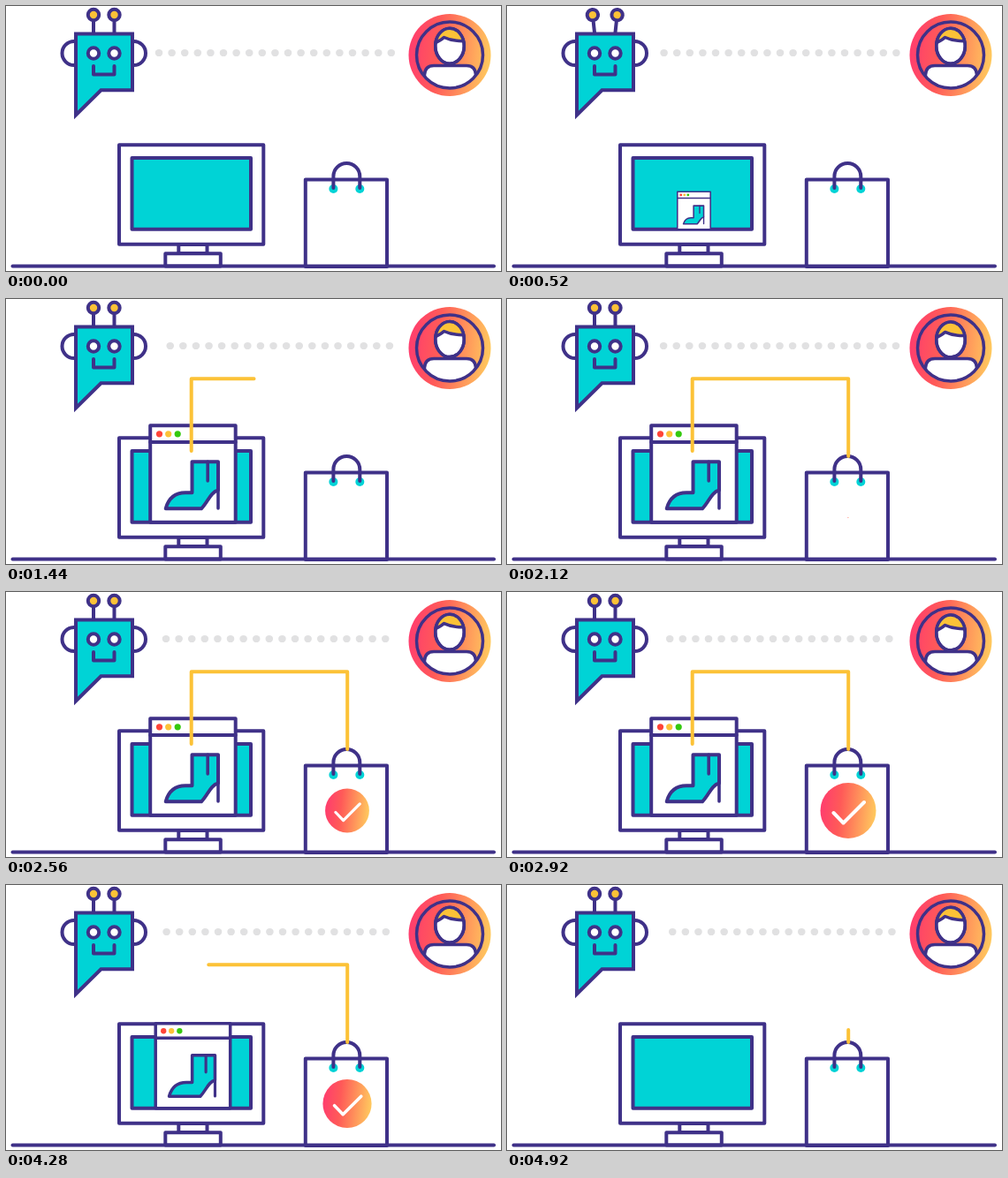
Recreate the animation shown at these times as an HTML page. Size 560 by 300 pixels, loop 4960 ms.

```html
<!DOCTYPE html>
<html lang="en">
<head>
<meta charset="utf-8">
<title>Shopping assistant</title>
<style>
html, body { margin: 0; width: 100%; height: 100%; overflow: hidden; background: #fff; }
svg { display: block; width: 100%; height: 100%; }
.ink { stroke: #3f3188; stroke-width: 4; stroke-linejoin: round; stroke-linecap: round; fill: none; }
.white { fill: #fff; }
.teal { fill: #00d3d6; }
.gold { fill: #fcc237; }
</style>
</head>
<body>
<svg viewBox="0 0 560 300">
  <defs>
    <linearGradient id="warm" x1="0" y1=".45" x2="1" y2=".55">
      <stop offset="0" stop-color="#ff3d6e"/>
      <stop offset=".35" stop-color="#ff5a58"/>
      <stop offset="1" stop-color="#ffca5e"/>
    </linearGradient>
    <clipPath id="ringClip"><circle cx="502" cy="55.5" r="37.5"/></clipPath>
    <clipPath id="headClip"><ellipse cx="502" cy="45.2" rx="16.3" ry="20"/></clipPath>
  </defs>
  <rect width="560" height="300" fill="#fff"/>

  <g id="dots" fill="#e1e1e2"></g>

  <!-- robot -->
  <g class="ink">
    <circle class="white" cx="77" cy="53.5" r="13.5"/>
    <circle class="white" cx="144.5" cy="53.5" r="13.5"/>
    <g id="antL"><path d="M99 18V30"/><circle class="gold" cx="99" cy="10" r="6.2"/></g>
    <g id="antR"><path d="M122.5 18V30"/><circle class="gold" cx="122.5" cy="10" r="6.2"/></g>
    <path class="teal" stroke-linejoin="miter" d="M79 31.5H143V95.3H107.5L79 123.5Z"/>
    <g id="eyes">
      <circle class="white" cx="99" cy="53.5" r="6.2"/>
      <circle class="white" cx="122.5" cy="53.5" r="6.2"/>
    </g>
    <path d="M99 68V77.5H122.5V68"/>
  </g>

  <!-- customer -->
  <circle cx="502" cy="55.5" r="46.5" fill="url(#warm)"/>
  <g class="ink" style="stroke-width:3.5">
    <path class="white" clip-path="url(#ringClip)" d="M473.5 100V78Q474 67.5 484 67.5H521Q531 67.5 531.5 78V100Z"/>
    <g id="head">
      <ellipse class="white" cx="502" cy="45.2" rx="16.3" ry="20"/>
      <g clip-path="url(#headClip)">
        <path id="hair" class="gold" d="M482 43Q491 40 495.500 35.500Q506 40.500 522 39.500V20H482Z"/>
      </g>
      <ellipse cx="502" cy="45.2" rx="16.3" ry="20"/>
    </g>
    <circle cx="502" cy="55.5" r="37.5"/>
  </g>

  <!-- computer -->
  <g class="ink">
    <path class="white" d="M195.300 270H227.500V280H195.300Z"/>
    <path class="white" d="M180.300 280.300H242.800V294.500H180.300Z"/>
    <path class="white" d="M128 157.300H291.300V269.700H128Z"/>
    <path class="teal" d="M142.500 172H277V252.700H142.500Z"/>
  </g>
  <g id="shop" class="ink">
    <path class="white" d="M163.200 143.200H259.700V252.700H163.200Z"/>
    <path d="M163.200 162H259.700"/>
    <g stroke="none">
      <circle cx="173.500" cy="152.800" r="3.600" fill="#ff4438"/>
      <circle cx="183.700" cy="152.800" r="3.600" fill="#fcc237"/>
      <circle cx="194.200" cy="152.800" r="3.600" fill="#35c90e"/>
    </g>
    <path class="teal" d="M210.500 184.200H240V216.500C231 219 229 229 221 237.300H180.700C184 225 192 219.300 203 219.300H210.500Z"/>
    <path d="M228.200 184.200V206M240 216.500V237" style="stroke-width:3.600"/>
  </g>

  <!-- bag -->
  <path class="ink white" d="M338.800 196.500H431V295H338.800Z"/>
  <circle class="teal" cx="370.400" cy="207" r="5"/>
  <circle class="teal" cx="400.300" cy="207" r="5"/>
  <path class="ink" d="M370.400 206V193A14.950 14.950 0 0 1 400.300 193V206"/>
  <path class="ink" d="M7.500 294.500H552"/>
  <g id="badge">
    <circle cx="386" cy="247.500" r="31.500" fill="url(#warm)"/>
    <path d="M369.500 250L380.500 261.500L404 238" fill="none" stroke="#fff" stroke-width="4" stroke-linecap="round" stroke-linejoin="round"/>
  </g>
  <path id="wire" d="M209.700 172V90.300H386.200V178" fill="none" stroke="#fcc237" stroke-width="4" stroke-linecap="round" stroke-linejoin="round"/>
</svg>
<script>
const LOOP = 4960, GAP = 14.6, DOT_START = 173, DOT_END = 441;
const $ = id => document.getElementById(id);
const wire = $('wire'), wireLen = wire.getTotalLength();

const span = (t, start, dur) => Math.min(1, Math.max(0, (t - start) / dur));
const cubic = x => x < .5 ? 4 * x ** 3 : 1 - 4 * (1 - x) ** 3;
const smooth = x => x * x * (3 - 2 * x);
const bump = (t, start, dur) => Math.sin(Math.PI * span(t, start, dur));

const dots = Array.from({ length: 19 }, () => {
  const dot = document.createElementNS('http://www.w3.org/2000/svg', 'ellipse');
  dot.setAttribute('cy', 53);
  dot.setAttribute('rx', 4.3);
  dot.setAttribute('ry', 4.1);
  return $('dots').appendChild(dot);
});

function show(el, on) {
  el.setAttribute('visibility', on ? 'visible' : 'hidden');
}

function scaleAt(el, x, y, sx, sy = sx) {
  show(el, sx > .001);
  el.setAttribute('transform', `translate(${x} ${y}) scale(${sx} ${sy}) translate(${-x} ${-y})`);
}

function draw(t) {
  const shift = t / LOOP * 3 * GAP % GAP;
  dots.forEach((dot, i) => {
    const x = DOT_START + shift + i * GAP;
    dot.setAttribute('cx', x);
    show(dot, x <= DOT_END);
  });

  // antennas and blinks repeat twice per loop
  const u = t % (LOOP / 2);
  const tilt = 8.5 * bump(u, 440, 320) - 2.5 * bump(u, 760, 320);
  $('antL').setAttribute('transform', `rotate(${-tilt} 99 30)`);
  $('antR').setAttribute('transform', `rotate(${tilt} 122.5 30)`);
  const blink = Math.max(bump(u, 120, 160), bump(u, 1200, 160));
  scaleAt($('eyes'), 110.75, 53.5, 1, 1 - .9 * blink);

  // three nods
  const nod = (1 - Math.cos(2 * Math.PI * 3 * span(t, 800, 2560))) / 2;
  $('head').setAttribute('transform', `translate(0 ${nod * .8})`);
  $('hair').setAttribute('transform', `translate(0 ${nod * 1.2})`);

  const leave = smooth(span(t, 4120, 730));
  scaleAt($('shop'), 211.5, 252.7, cubic(span(t, 80, 960)) - leave);
  scaleAt($('badge'), 386, 247.5, cubic(span(t, 1960, 960)) - leave);

  const from = wireLen * span(t, 4000, 960);
  const to = wireLen * span(t, 1000, 1000);
  show(wire, to > from);
  wire.setAttribute('stroke-dasharray', `${Math.max(0, to - from)} 999`);
  wire.setAttribute('stroke-dashoffset', -from);
}

const begin = performance.now();
function tick() {
  draw((performance.now() - begin) % LOOP);
  requestAnimationFrame(tick);
}
tick();
</script>
</body>
</html>
```
